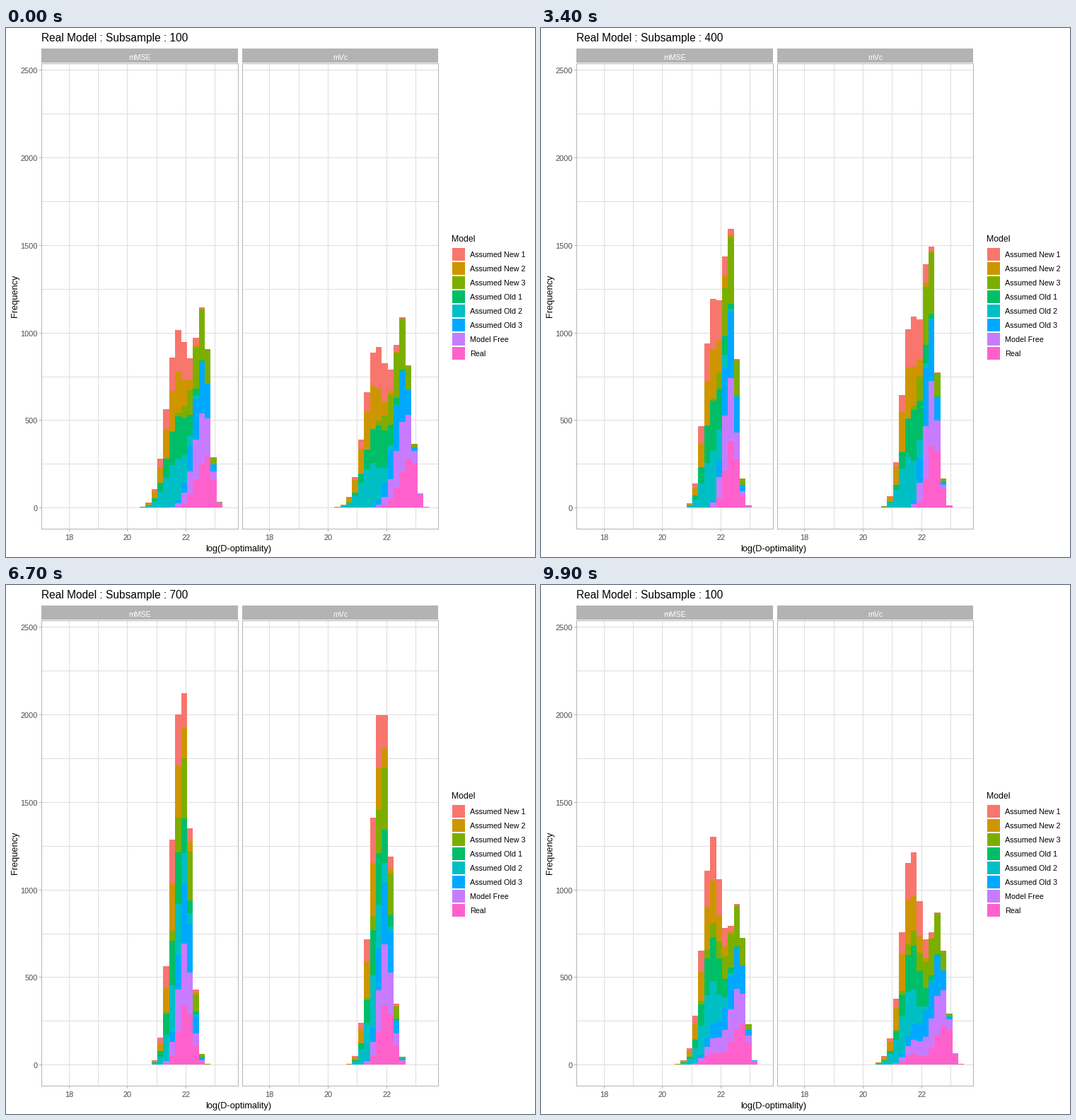
A matplotlib script that plays this animation: 748 px wide and 748 px high, repeating every 10000 ms.

```python
import numpy as np
import matplotlib.pyplot as plt
from matplotlib.animation import FuncAnimation
from matplotlib.collections import PolyCollection
from matplotlib.patches import Rectangle

SIZE, DPI = 748, 100
FRAMES, INTERVAL = 100, 100

MODELS = ["Assumed New 1", "Assumed New 2", "Assumed New 3", "Assumed Old 1",
          "Assumed Old 2", "Assumed Old 3", "Model Free", "Real"]
COLORS = ["#F8766D", "#CD9600", "#7CAE00", "#00BE67",
          "#00BFC4", "#00A9FF", "#C77CFF", "#FF61CC"]
GREY, GRID, TICK_TEXT = "#B3B3B3", "#DEDEDE", "#4D4D4D"

PANELS = ["mMSE", "mVc"]
LEFT, RIGHT = [50, 334], [328, 611]
TOP, BOTTOM, BASE = 50, 708, 678
SHIFT = 283.7               # horizontal distance between the panels
BIN0, BIN_W, BINS = 130.9, 8.37, 22
RUNS = 1000                 # simulations behind every model

# Peak of each curve, in bins, at subsample sizes 100, 500 and 900
PEAKS = {
    "mMSE": {"1": (13.3, 13.0, 12.55), "2": (12.6, 12.7, 12.5),
             "3": (17.2, 15.4, 12.95), "Free": (17.3, 15.15, 12.9),
             "Real": (18.0, 15.6, 12.95)},
    "mVc": {"1": (13.3, 12.95, 12.5), "2": (11.9, 12.05, 12.3),
            "3": (16.9, 15.1, 12.8), "Free": (17.5, 15.2, 12.85),
            "Real": (18.5, 15.75, 12.85)},
}

# Each move starts at a frame and ends on the next state; two are slower
STEPS = [6, 6, 5, 5, 5, 5, 5, 5, 5]
STARTS = [6, 18] + list(range(30, 97, 11))


def y_px(count):
    return BASE + 0.25 - 0.2476 * count


def x_px(value, panel):
    return 89.1 + 41.3 * (value - 18) + SHIFT * panel


def spread(curve, k):
    """Left and right width of a curve at subsample size 100 k."""
    if curve in "12":
        return 1.25 + 0.6 / k, 1.27 + 0.02 * (9 - k)
    return 0.95 + 0.03 * k + 0.85 / k ** 2, 0.9 + 0.004 * k ** 2


def counts(panel, k):
    """Histogram of every model (rows) over the bins."""
    rows = []
    for model in MODELS:
        curve = model.split()[-1]
        peak = np.polyval(np.polyfit([1, 5, 9], PEAKS[panel][curve], 2), k)
        left, right = spread(curve, k)
        d = np.arange(BINS) - peak
        h = np.exp(-0.5 * (d / np.where(d < 0, left, right)) ** 2)
        rows.append(RUNS * h / h.sum())
    return np.array(rows)


STATES = np.array([[counts(p, k) for p in PANELS] for k in range(1, 10)])


def position(frame):
    """Current state, next state and the fraction between them."""
    i = sum(s <= frame for s in STARTS) - 1
    if i < 0:
        return 0, 0, 0.0
    t = min(1.0, (frame - STARTS[i] + 1) / STEPS[i])
    return i, (i + 1) % len(STATES), t


fig = plt.figure(figsize=(SIZE / DPI, SIZE / DPI), dpi=DPI, facecolor="white")
ax = fig.add_axes([0, 0, 1, 1])
ax.set(xlim=(0, SIZE), ylim=(SIZE, 0))
ax.axis("off")


def box(x, y, w, h, color, z=1):
    ax.add_patch(Rectangle((x, y), w, h, fc=color, lw=0,
                           antialiased=False, zorder=z))


def label(x, y, text, px, color="black", **kw):
    return ax.text(x, y, text, fontsize=px * 72 / DPI, color=color,
                   family="Liberation Sans", **kw)


for p, name in enumerate(PANELS):
    x0, x1 = LEFT[p], RIGHT[p]
    for v in range(0, 2501, 250):
        box(x0, round(y_px(v)), x1 - x0, 1, GRID)
    for v in range(18, 24):
        x = int(x_px(v, p))
        box(x, TOP, 1, BOTTOM - TOP, GRID)
        if v % 2 == 0:
            box(x, BOTTOM, 1, 4, GREY)
            label(x + 0.5, 724, str(v), 11, TICK_TEXT, ha="center")
    box(x0, 29, x1 - x0, 20, GREY)
    label((x0 + x1) / 2, 45, name, 10.5, "white", ha="center")
    for x in (x0, x1):
        box(x, TOP, 1, BOTTOM - TOP + 1, GREY, 3)
    for y in (TOP, BOTTOM):
        box(x0, y, x1 - x0 + 1, 1, GREY, 3)

for v in range(0, 2501, 500):
    y = round(y_px(v))
    box(47, y, 3, 1, GREY)
    label(45, y + 5, str(v), 11, TICK_TEXT, ha="right")

label(329, 740, "log(D-optimality)", 12.7, ha="center")
label(13, 378.5, "Frequency", 12.8, rotation=90, ha="center", va="center")
label(630, 302, "Model", 12.3)
for i, (name, color) in enumerate(zip(MODELS, COLORS)):
    box(631, 311 + 20 * i, 18, 18, color)
    label(656, 324 + 20 * i, name, 10.8)
title = label(50, 19, "", 15.5)

bars = PolyCollection([], facecolors=COLORS * (2 * BINS), edgecolors="none",
                      linewidths=0, antialiaseds=False, zorder=2)
ax.add_collection(bars, autolim=False)

edges = np.array([np.floor(BIN0 + BIN_W * np.arange(BINS + 1) + SHIFT * p)
                  for p in range(2)])


def bar_verts(m):
    """Quads of the stacked bars; the last model lies at the bottom."""
    top = m[:, ::-1].cumsum(1)[:, ::-1]
    hi, lo = np.round(y_px(top)), np.round(y_px(top - m))
    x0 = np.broadcast_to(edges[:, None, :-1], m.shape)
    x1 = np.broadcast_to(edges[:, None, 1:], m.shape)
    quads = np.stack([np.stack(c, -1) for c in
                      ((x0, lo), (x1, lo), (x1, hi), (x0, hi))], -2)
    return quads.transpose(0, 2, 1, 3, 4).reshape(-1, 4, 2)


def update(frame):
    a, b, t = position(frame)
    bars.set_verts(bar_verts((1 - t) * STATES[a] + t * STATES[b]))
    nearest = b if t > 0.5 else a
    title.set_text(f"Real Model : Subsample : {100 * (nearest + 1)}")
    return bars, title


anim = FuncAnimation(fig, update, frames=FRAMES, interval=INTERVAL,
                     repeat=True, repeat_delay=0)
plt.show()
```
